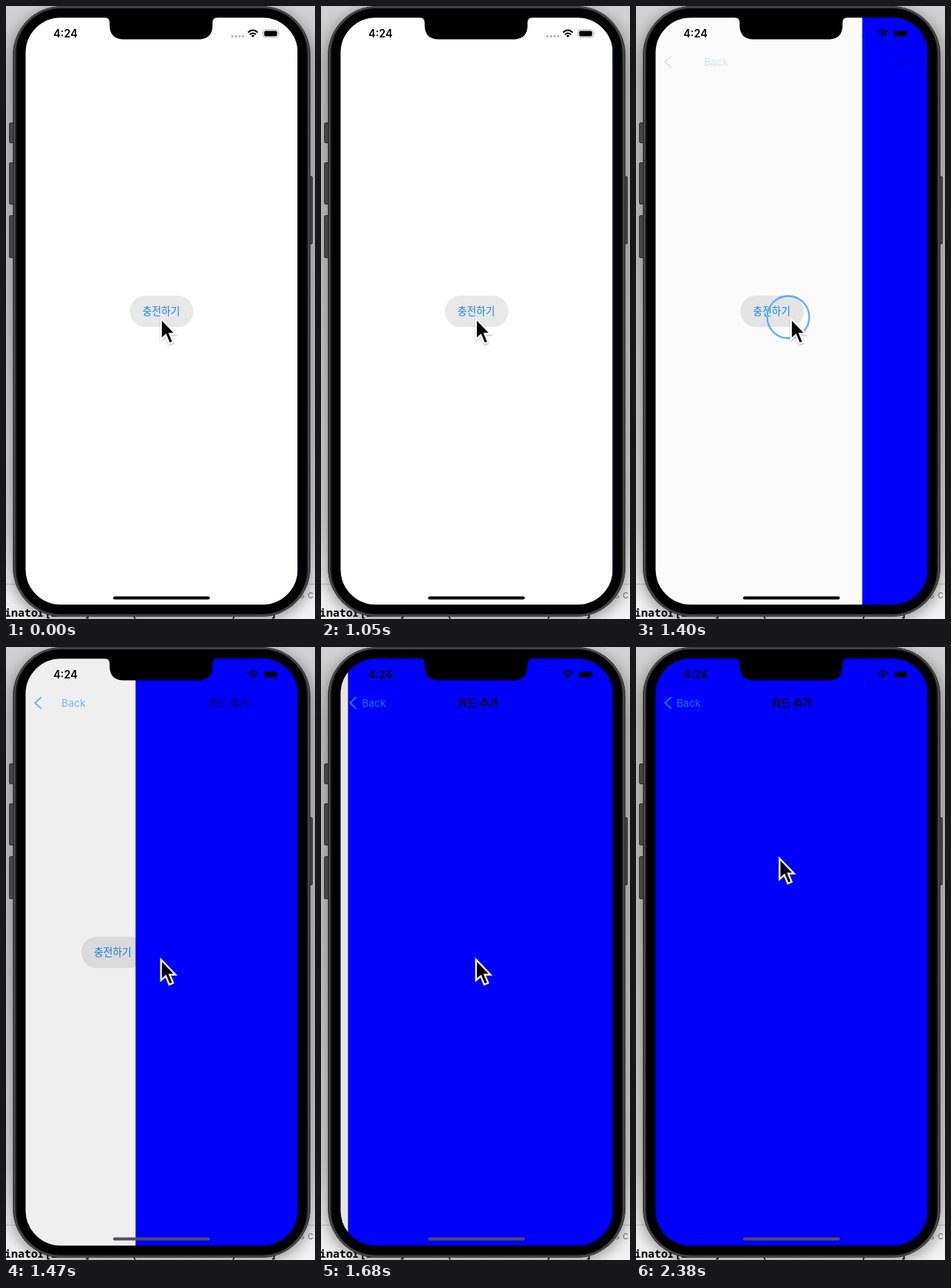
Recreate the animation shown at these times as an HTML page. Size 404 by 800 pixels, loop 2450 ms.

```html
<!DOCTYPE html>
<html lang="ko">
<head>
<meta charset="utf-8">
<title>Push transition</title>
<style>
  html, body { margin: 0; width: 100%; height: 100%; overflow: hidden; background: #c4c4c4; }
  svg { display: block; width: 404px; height: 800px; }
  text { white-space: pre; }
  .latin { font-family: Inter, sans-serif; }
  .hangul { font-family: "Noto Sans CJK KR", "Noto Sans CJK", sans-serif; font-size: 13.3px; }
  .code { font: bold 14.5px "Noto Sans Mono", "DejaVu Sans Mono", monospace; }
</style>
</head>
<body>
<svg viewBox="0 0 404 800">
  <defs>
    <linearGradient id="desk" x2="0" y2="1">
      <stop offset="0" stop-color="#d2d2d2"/>
      <stop offset=".12" stop-color="#c0c0c0"/>
      <stop offset=".4" stop-color="#c2c2c2"/>
      <stop offset=".85" stop-color="#d2d2d2"/>
      <stop offset=".95" stop-color="#ececec"/>
      <stop offset="1" stop-color="#f2f2f2"/>
    </linearGradient>
    <filter id="blur" x="-20%" y="-20%" width="140%" height="140%"><feGaussianBlur stdDeviation="9"/></filter>
    <filter id="soft" x="-50%" y="-50%" width="200%" height="200%">
      <feDropShadow dx="0" dy="1" stdDeviation="1.2" flood-opacity=".35"/>
    </filter>
    <clipPath id="screen"><rect x="24" y="13" width="359" height="770" rx="42"/></clipPath>
  </defs>

  <!-- desktop behind the phone -->
  <rect width="404" height="800" fill="url(#desk)"/>
  <path d="M0 754.5H404" stroke="#c2c2c2"/>
  <rect x="9" y="4" width="389" height="797" rx="62" opacity=".38" filter="url(#blur)"/>
  <text class="latin" x="383" y="773" font-size="14" fill="#777">s c</text>
  <text class="code" x="-2" y="797">inator[index].start(animated: true)     ]</text>

  <!-- phone body -->
  <g fill="#464646" stroke="#2b2b2b">
    <rect x="4.5" y="152.5" width="8" height="26" rx="1.5"/>
    <rect x="4.5" y="204.5" width="8" height="54" rx="1.5"/>
    <rect x="4.5" y="273.5" width="8" height="55" rx="1.5"/>
    <rect x="394.5" y="222.5" width="6" height="88" rx="1.5"/>
  </g>
  <rect x="9" y="0" width="389" height="797" rx="64" fill="#262626"/>
  <rect x="11" y="1.5" width="385" height="794" rx="62" fill="none" stroke="#4a4a4a" stroke-width="2"/>

  <g clip-path="url(#screen)">
    <rect x="24" y="13" width="359" height="770" fill="#fff"/>
    <g id="home">
      <rect x="162" y="378" width="83" height="41" rx="20.5" fill="#e8e8e9"/>
      <text class="hangul" x="178.5" y="403" font-weight="500" fill="#1484ff">충전하기</text>
    </g>
    <rect id="dim" x="24" y="13" width="359" height="770" opacity="0"/>
    <rect id="card" x="26" y="13" width="360" height="770" fill="#00f"/>
    <g id="nav" opacity="0">
      <path d="M45.500 66L38 73L45.500 80" fill="none" stroke="#0a80ff" stroke-width="2" stroke-linecap="round" stroke-linejoin="round"/>
      <text id="back" class="latin" x="53" y="78" font-size="13.5" fill="#0a80ff">Back</text>
      <text id="title" class="hangul" x="177" y="78" font-weight="700">카드 추가</text>
    </g>

    <!-- status bar -->
    <text class="latin" x="62" y="41" font-size="14" font-weight="600">4:24</text>
    <g id="faint" opacity=".3">
      <circle cx="296" cy="39.5" r="1.5"/><circle cx="300.7" cy="39.5" r="1.5"/>
      <circle cx="305.3" cy="39.5" r="1.5"/><circle cx="310" cy="39.5" r="1.5"/>
      <rect x="335.8" y="31" width="20.5" height="10" rx="3" fill="none" stroke="#000"/>
      <path d="M357.5 34.2Q359 36 357.5 37.8Z"/>
    </g>
    <path d="M316.500 34.500Q322.800 28.500 329.100 34.500M318.900 37.200Q322.800 33.700 326.700 37.200" fill="none" stroke="#000" stroke-width="2"/>
    <path d="M320.600 38.700Q322.800 37 325 38.700L322.800 41Z"/>
    <rect x="337.5" y="32.6" width="17" height="6.8" rx="1.6"/>
    <rect id="bar" x="140" y="770.4" width="126.5" height="4.2" rx="2.1"/>
  </g>

  <!-- bezel and notch cover the edge of the screen -->
  <rect x="19.6" y="9.2" width="367.8" height="778" rx="52" fill="none" stroke="#000" stroke-width="12"/>
  <path d="M129 13V15Q135.500 15 135.500 22V25Q135.500 43.500 154 43.500H251.500Q270 43.500 270 25V22Q270 15 276.500 15V13Z"/>

  <circle id="ring" cx="199" cy="406" r="27.5" fill="none" stroke="#62acf8" stroke-width="2.300"/>
  <g id="cursor" filter="url(#soft)">
    <path d="M0 0V27L6.200 21.400L10.800 32.500L15.800 30.400L11.200 19.700H19Z" stroke="#fff" stroke-width="2.200"/>
  </g>
</svg>
<script>
  const LOOP = 2450, STEP = 70, WIDTH = 355;
  const part = id => document.getElementById(id);
  const [home, dim, card, nav, back, title, faint, bar, ring, cursor] =
    ["home", "dim", "card", "nav", "back", "title", "faint", "bar", "ring", "cursor"].map(part);
  const move = (el, x, y = 0) => el.setAttribute("transform", `translate(${x} ${y})`);
  const fade = (el, value) => el.setAttribute("opacity", value);
  const smooth = x => x * x * (3 - 2 * x);

  // Distance still to go, 1 to 0, of an underdamped spring
  function spring(t, speed, damping) {
    if (t <= 0) return 1;
    const a = speed * damping, b = speed * Math.sqrt(1 - damping ** 2);
    return Math.exp(-a * t) * (Math.cos(b * t) + a / b * Math.sin(b * t));
  }

  function draw(t) {
    const rest = spring(t - 1337, 0.0146, 0.95), p = 1 - rest;
    const navRest = spring(t - 1330, 0.0128, 0.85);
    move(home, -0.3 * WIDTH * p);
    fade(dim, 0.1 * smooth(p));
    move(card, WIDTH * rest - (p > 0.999 ? 2 : 0));
    fade(nav, p ** 1.25);
    move(back, 47.5 * navRest);
    move(title, 212 * navRest);
    fade(faint, p > 0.1 ? 0.1 : 0.3);
    bar.setAttribute("fill", p > 0.5 ? "#50505a" : "#000");
    fade(ring, t >= 1120 && t <= 1400 ? 1 : 0);

    const k = Math.max(0, (t - 2100) / 280) ** 2;
    move(cursor, 202.7 - 15 * k, 408 - 132 * k);
  }

  const start = performance.now();
  function tick() {
    const t = (performance.now() - start) % LOOP;
    draw(Math.floor(t / STEP) * STEP);
    requestAnimationFrame(tick);
  }
  tick();
</script>
</body>
</html>
```
